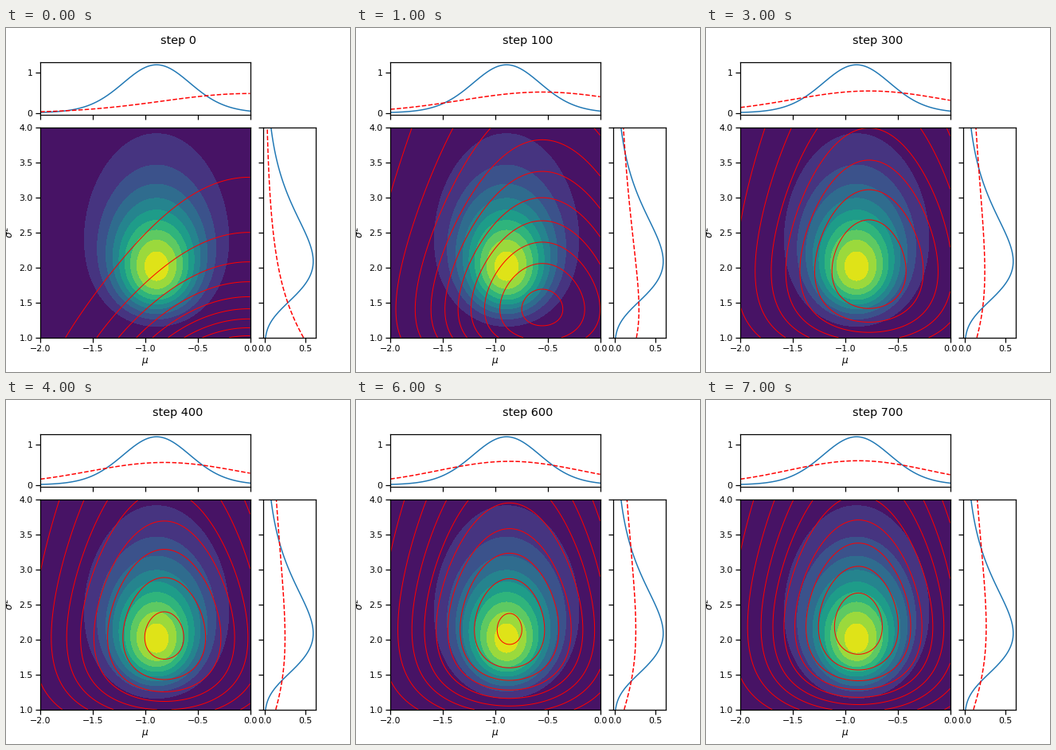
Animation of 432x432 px, one loop 8000 ms. Source, as a matplotlib script:

```python
from math import exp, lgamma, log, pi, sqrt

import numpy as np
import matplotlib.pyplot as plt
from matplotlib.animation import FuncAnimation

plt.rcParams.update({
    "font.family": "DejaVu Sans",
    "font.size": 12,
    "axes.labelsize": 12,
    "axes.linewidth": 1.25,
    "lines.linewidth": 1.5,
})
for axis in ("xtick", "ytick"):
    plt.rcParams[axis + ".labelsize"] = 11
    plt.rcParams[axis + ".major.size"] = 6
    plt.rcParams[axis + ".major.width"] = 1.25

# Exact posterior: normal-inverse-gamma over (mu, sigma^2)
CENTER, KAPPA, ALPHA, BETA = -0.892, 21, 11, 25.1
FRAMES, STEPS_PER_FRAME = 8, 100


def normal(x, mean, sd):
    return np.exp(-0.5 * ((x - mean) / sd) ** 2) / (sd * sqrt(2 * pi))


def lognormal(x, mean, sd):
    return normal(np.log(x), mean, sd) / x


def inv_gamma(x, a, b):
    return np.exp(a * log(b) - lgamma(a) - (a + 1) * np.log(x) - b / x)


def student(x, dof, loc, scale):
    norm = exp(lgamma((dof + 1) / 2) - lgamma(dof / 2)) / (scale * sqrt(dof * pi))
    return norm * (1 + ((x - loc) / scale) ** 2 / dof) ** (-(dof + 1) / 2)


def fit(u):
    """Mean-field fit after u hundred steps: (mean, sd) of mu and of log sigma^2.

    A quick initial transient is followed by slow convergence.
    """
    fast = exp(-2.5 * u)
    mean = CENTER + 0.5 * exp(-0.48 * u) + 0.382 * fast
    sd = 0.784 - 0.017 * u + 0.046 * fast
    log_mean = 1.12 * (1 - exp(-1.5 * u))
    log_sd = 0.45 + 0.306 * exp(-0.121 * u) + 0.074 * fast
    return (mean, sd), (log_mean, log_sd)


mu = np.linspace(-2, 0, 100)
var = np.linspace(1, 4, 100)
M, V = np.meshgrid(mu, var)
joint = normal(M, CENTER, np.sqrt(V / KAPPA)) * inv_gamma(V, ALPHA, BETA)

fig = plt.figure(figsize=(6, 6), dpi=72)
grid = fig.add_gridspec(2, 2, width_ratios=(4, 1), height_ratios=(1, 4),
                        left=0.1, right=0.9, bottom=0.1, top=0.9,
                        wspace=0.1, hspace=0.1)
ax = fig.add_subplot(grid[1, 0])
ax_mu = fig.add_subplot(grid[0, 0], sharex=ax)
ax_var = fig.add_subplot(grid[1, 1], sharey=ax)
ax_mu.tick_params(axis="x", labelbottom=False)
ax_var.tick_params(axis="y", labelleft=False)

ax.contourf(M, V, joint, levels=np.linspace(0, 0.8, 11), cmap="viridis")
ax.set_xlabel(r"$\mu$")
ax.set_ylabel(r"$\sigma^2$")

ax_mu.plot(mu, student(mu, 2 * ALPHA, CENTER, sqrt(BETA / (ALPHA * KAPPA))))
ax_var.plot(inv_gamma(var, ALPHA, BETA), var)
q_mu, q_var = fit(0)
fit_mu, = ax_mu.plot(mu, normal(mu, *q_mu), "r--")
fit_var, = ax_var.plot(lognormal(var, *q_var), var, "r--")

ax.set_xlim(-2, 0)
ax.set_ylim(1, 4)
ax.set_xticks(np.arange(-2, 0.1, 0.5))
ax.set_yticks(np.arange(1, 4.1, 0.5))
ax_mu.set_yticks([0, 1])
ax_var.set_xticks([0, 0.5])

title = fig.suptitle("step 0")
lines = []


def draw(i):
    q_mu, q_var = fit(i)
    while lines:
        lines.pop().remove()
    q = normal(M, *q_mu) * lognormal(V, *q_var)
    lines.append(ax.contour(M, V, q, levels=10, colors="red", linewidths=1))
    fit_mu.set_ydata(normal(mu, *q_mu))
    fit_var.set_xdata(lognormal(var, *q_var))
    title.set_text(f"step {STEPS_PER_FRAME * i}")
    return [fit_mu, fit_var, title]


anim = FuncAnimation(fig, draw, frames=FRAMES, interval=1000,
                     repeat=True, repeat_delay=0, blit=False)
plt.show()
```
